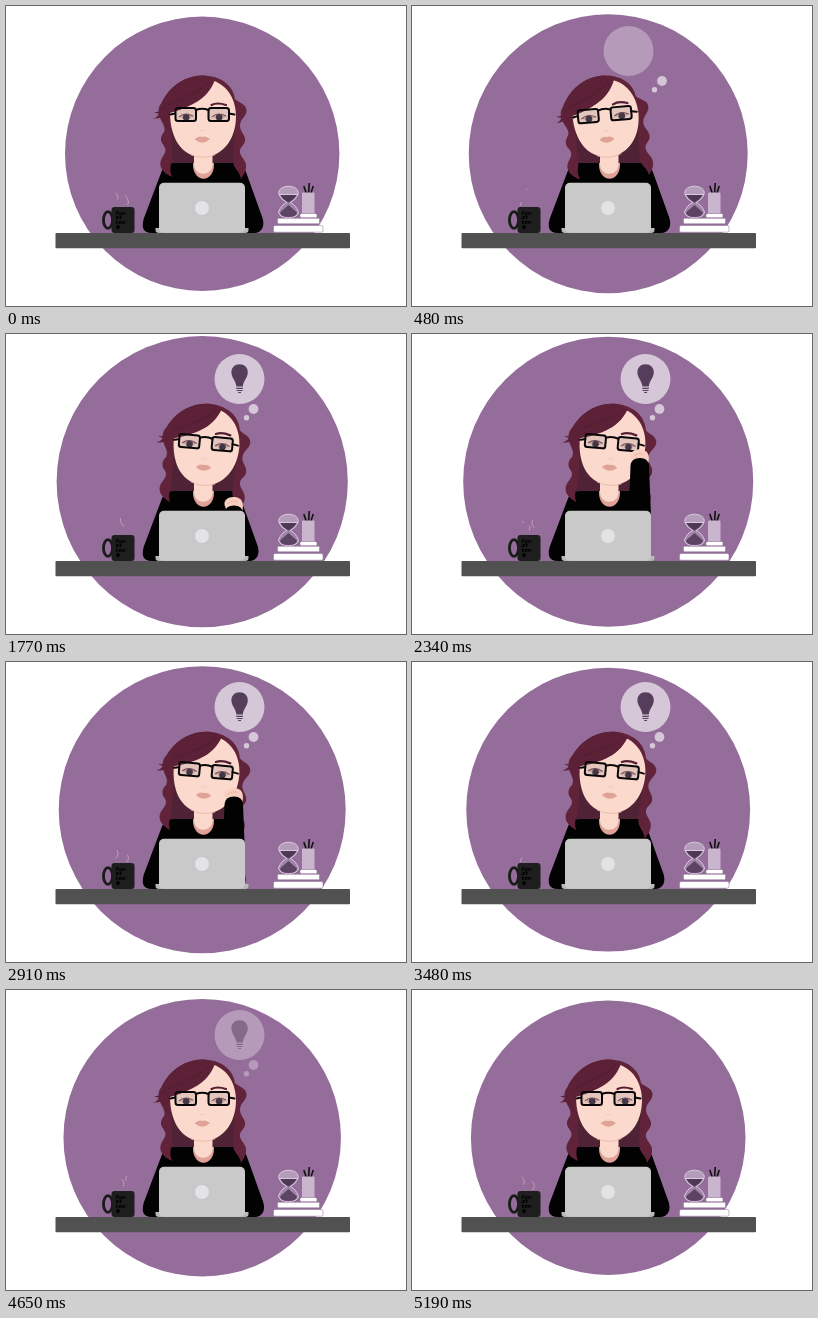
These frames come from a looping animation (400 by 300 pixels, 5220 ms). An HTML page:

```html
<!DOCTYPE html>
<html lang="en">
<head>
<meta charset="utf-8">
<title>Idea at the desk</title>
<style>
html, body { margin: 0; width: 100%; height: 100%; overflow: hidden; background: #fff; }
svg { display: block; width: 100vw; height: 100vh; }
.line { fill: none; stroke-linecap: round; }
.steam { stroke: #c7a3bd; stroke-width: .9; }
.mug text { font: italic bold 5.5px "DejaVu Sans", sans-serif; fill: #000; }
.book { fill: #fff; stroke: #8a6b91; stroke-width: .5; }
</style>
</head>
<body>
<svg viewBox="0 0 400 300">
  <defs>
    <clipPath id="aboveDesk"><path d="M0 0H400V228H0Z"/></clipPath>
    <g id="lens">
      <rect width="20.500" height="13" rx="2.500" fill="#6b5560" fill-opacity=".16"/>
      <path d="M3.500 8.500Q10 3 17.500 8Q13 12 9 11.500Z" fill="#c9a5a3"/>
      <circle cx="10.700" cy="9.300" r="3.300" fill="#433745"/>
      <path class="line" d="M3.500 8.700Q10 3.500 17.500 8" stroke="#6b4a55"/>
      <rect width="20.500" height="13" rx="2.500" fill="none" stroke="#080608" stroke-width="2"/>
    </g>
  </defs>

  <circle id="disc" cx="196.2" cy="147.7" fill="#946d9a"/>

  <g id="bubbles" fill="#fff">
    <circle cy="83.7" r="2.7"/>
    <circle cy="75" r="4.9"/>
    <circle cy="45" r="25"/>
  </g>
  <g id="bulb" fill="#573d5c">
    <path d="M233.600 30.200C228.700 30.200 225.400 33.700 225.400 38.200C225.400 44 230 46.500 230.400 52.600H236.800C237.200 46.500 241.800 44 241.800 38.200C241.800 33.700 238.500 30.200 233.600 30.200Z"/>
    <path d="M230.300 54.400H236.900M230.700 56.500H236.500M232.200 58.500H235" stroke="#573d5c" stroke-width="1.200"/>
  </g>

  <path class="sway" d="M160 100H232L234 162H160Z" fill="#4f2335"/>

  <!-- body -->
  <path id="restArm" d="M222 157C232 157 237 159 240 166L256.500 212C259 220 256 227 248 227H215Z" fill="#020202"/>
  <path d="M168 157H226Q232 157 234 163V227H146C137 227 135 221 138 212L155 167Q158 157 168 157Z" fill="#020202"/>
  <path d="M187 157C186 178 209 178 208 157Z" fill="#e0a198"/>
  <path d="M188 146H206.500V158C206.500 171 188 171 188 158Z" fill="#fad8cb"/>

  <g class="sway">
    <!-- hair and face -->
    <path d="M195 69.500C213 69 227 78 229 93C233 97 241 98 240.500 105C240 111 234 113 234 120C234 126 240 129 239 135C238 140 233 141 234 147C236 153 241 155 240 162C239 168 237 169 235 173C234 165 227 163 227 154L229 116L165 114L166 148C167 157 162 160 166 171C155 166 152 159 156 152C159 147 161 145 158 140C153 134 155 130 158 126C160 121 156 117 154 112Q151 104 154 99C157 96 156 95 159 91C166 79 180 70 195 69.500Z" fill="#602339"/>
    <path d="M208 75C220 79 230 92 230 110C230 134 216 151 197 151C177 151 164 134 164 106C178 100 196 90 208 75Z" fill="#fbdacd"/>
    <path class="line" d="M185 149Q197 153.500 209 149" stroke="#e9b5a9" stroke-width=".8"/>
    <path d="M208.500 75C203 89 192 99 164 107Q162 115 163 123C157 117 152 108 155 98C164 79 180 70 196 69.500Q205 70 208.500 75Z" fill="#5c2137"/>
    <path class="line" d="M203 75C194 87 178 90 162 99" stroke="#4f1b30" stroke-width=".8"/>
    <path d="M157 101Q154 107 148 106Q151 108 153 107.500Q151 112 147 112.500Q153 113 158 110Z" fill="#5c2137"/>

    <path class="line" d="M205.500 99Q211 96 220 99" stroke="#541f33" stroke-width="2.200"/>
    <path class="line" d="M194.500 124.500Q196.500 125.500 198.500 124.500" stroke="#f3c3b6" stroke-width=".9"/>
    <path d="M188.500 133.300Q193 129.500 196.300 131Q200 129.500 204 133.300Q196.300 140 188.500 133.300Z" fill="#dfa297"/>

    <use href="#lens" x="169.500" y="102"/>
    <use href="#lens" x="202.500" y="102"/>
    <path class="line" d="M190 104Q196 101.500 202.500 104M169 107.500L164.500 108.500M223 107.500L228.500 108.500" stroke="#080608" stroke-width="2"/>
  </g>

  <g clip-path="url(#aboveDesk)">
    <g id="raisedArm">
      <path d="M219.500 126C216 119 222 114.500 229 115.500C236 116.500 238 121 236.500 129L221 131Z" fill="#f8cfc1"/>
      <path class="line" d="M222 122Q226 118 231 120" stroke="#e8b2a5" stroke-width=".8"/>
      <path d="M218.500 132Q219 124 228 124Q236.500 124 237 132L239 182V222H215Z" fill="#020202"/>
    </g>
  </g>

  <!-- laptop -->
  <path d="M149.500 222H242.500V224Q242.500 227 239 227H153Q149.500 227 149.500 224Z" fill="#b8b8b8"/>
  <rect x="153" y="176.800" width="86" height="50" rx="5" fill="#c9c9c9"/>
  <circle cx="196" cy="202" r="7" fill="#e5e3e7"/>

  <!-- hourglass -->
  <g stroke="#d9cbdd" stroke-width="1">
    <ellipse cx="282.500" cy="186.500" rx="9.800" ry="6.300" fill="#b49cbb"/>
    <path d="M273 188.500H292Q290 194 284 196.500Q290 199 292.500 206Q292 211.500 282.500 211.500Q273 211.500 272.500 206Q275 199 281 196.500Q275 194 273 188.500Z" fill="#a184aa"/>
  </g>
  <path d="M274.500 189H290.500Q288 194 282.500 196.500Q277 194 274.500 189Z" fill="#4f3854"/>
  <path d="M282.500 199L291 206.500Q290 211 282.500 211Q275 211 274 206.500Z" fill="#5d4463"/>

  <!-- pencil cup and books -->
  <path d="M300.500 188L297.800 180M302.500 188L303.300 177M304.500 188L307.300 180" stroke="#111" stroke-width="1.600"/>
  <rect x="296" y="186.500" width="12.500" height="21" rx="1" fill="#c9b5cd"/>
  <rect class="book" x="294" y="207.500" width="17" height="4.200" rx="1.500"/>
  <rect class="book" x="271.500" y="212.300" width="42" height="5.500" rx="1"/>
  <rect class="book" x="267.500" y="219.500" width="49.500" height="6.700" rx="1.500"/>

  <!-- mug -->
  <path class="line steam" pathLength="1" d="M108.500 199.500Q108.500 197 111 194.500Q114 191 110 187"/>
  <path class="line steam" pathLength="1" d="M117.500 196Q119 192 116 190Q113 187 115 183"/>
  <path class="line steam" pathLength="1" d="M120.500 200Q124 197 121.500 193Q118.500 190 120.500 186"/>
  <g class="mug">
    <ellipse cx="102" cy="214" rx="4.500" ry="8.300" fill="none" stroke="#1b1a1b" stroke-width="2.800"/>
    <rect x="105.500" y="201" width="23" height="26" rx="3" fill="#1f1e1f"/>
    <text x="109.500" y="208.500">fun</text>
    <text x="109.500" y="213.300">at</text>
    <text x="109.500" y="218">ten</text>
    <circle cx="112" cy="221" r="1.900"/>
  </g>

  <rect x="49.500" y="227" width="294.500" height="15.300" rx=".8" fill="#505150"/>
</svg>

<script>
const LOOP = 5220, STEP = 30, PUFF = LOOP / 7;
const $ = id => document.getElementById(id);
const all = css => [...document.querySelectorAll(css)];
const clamp = u => Math.min(1, Math.max(0, u));

// Eased 0 to 1 between a and b
function ramp(t, a, b) {
  const u = clamp((t - a) / (b - a));
  return u * u * (3 - 2 * u);
}
// Up between a and b, down again between c and d
const pulse = (t, a, b, c, d) => ramp(t, a, b) - ramp(t, c, d);

const discRadius = t => 137.2 + 9 * Math.min(t / 1900, (LOOP - t) / (LOOP - 1900));
const headTilt = t => 5.2 * (2 * ramp(t, 1010, 1600) - ramp(t, 60, 450) - ramp(t, 3550, 4080));
const elbowShift = t => Math.sin(7 * Math.PI * t / LOOP) - 18 * pulse(t, 1600, 2050, 2800, 3900);

const shapes = all('#bubbles circle');
const bubbles = [
  { home: 240.5, settle: 2, enter: 2 },
  { home: 247.5, settle: 2.5, enter: 0 },
  { home: 233.5, settle: 4.5, enter: -43 }
];
const curls = all('.steam');
const curlPhase = [.45, .98, .3];

function drawBubbles(t) {
  const loose = 1 - ramp(t, 1250, 1650);
  bubbles.forEach((b, i) => {
    const born = 90 + 120 * i, shown = ramp(t, born, born + 300);
    shapes[i].setAttribute('cx', b.home + b.settle * loose + b.enter * (1 - shown));
    shapes[i].setAttribute('opacity', .62 * (shown - ramp(t, 4450, 4850)));
  });
  $('bulb').setAttribute('opacity', pulse(t, 1400, 1650, 4450, 4850));
}

function drawArms(t) {
  const up = pulse(t, 1600, 2050, 2800, 3250);
  $('raisedArm').setAttribute('transform', `translate(0 ${(1 - up) * 70})`);
  $('raisedArm').style.display = up > 0 ? '' : 'none';
  $('restArm').setAttribute('transform', `translate(${elbowShift(t)} 0)`);
}

// A short stroke travels up each curl, then pauses
function drawSteam(t) {
  curls.forEach((el, i) => {
    const u = (t / PUFF + curlPhase[i]) % 1;
    const head = clamp(u / .4), tail = clamp((u - .25) / .4);
    el.style.display = head - tail > .01 ? '' : 'none';
    el.style.strokeDasharray = `${head - tail} 2`;
    el.style.strokeDashoffset = -tail;
  });
}

function draw(t) {
  $('disc').setAttribute('r', discRadius(t));
  for (const el of all('.sway')) el.setAttribute('transform', `rotate(${headTilt(t)} 196 148)`);
  drawBubbles(t);
  drawArms(t);
  drawSteam(t);
}

const start = performance.now();
function tick() {
  const t = Math.max(0, performance.now() - start) % LOOP;
  draw(Math.floor(t / STEP) * STEP);
  requestAnimationFrame(tick);
}
draw(0);
requestAnimationFrame(tick);
</script>
</body>
</html>
```
